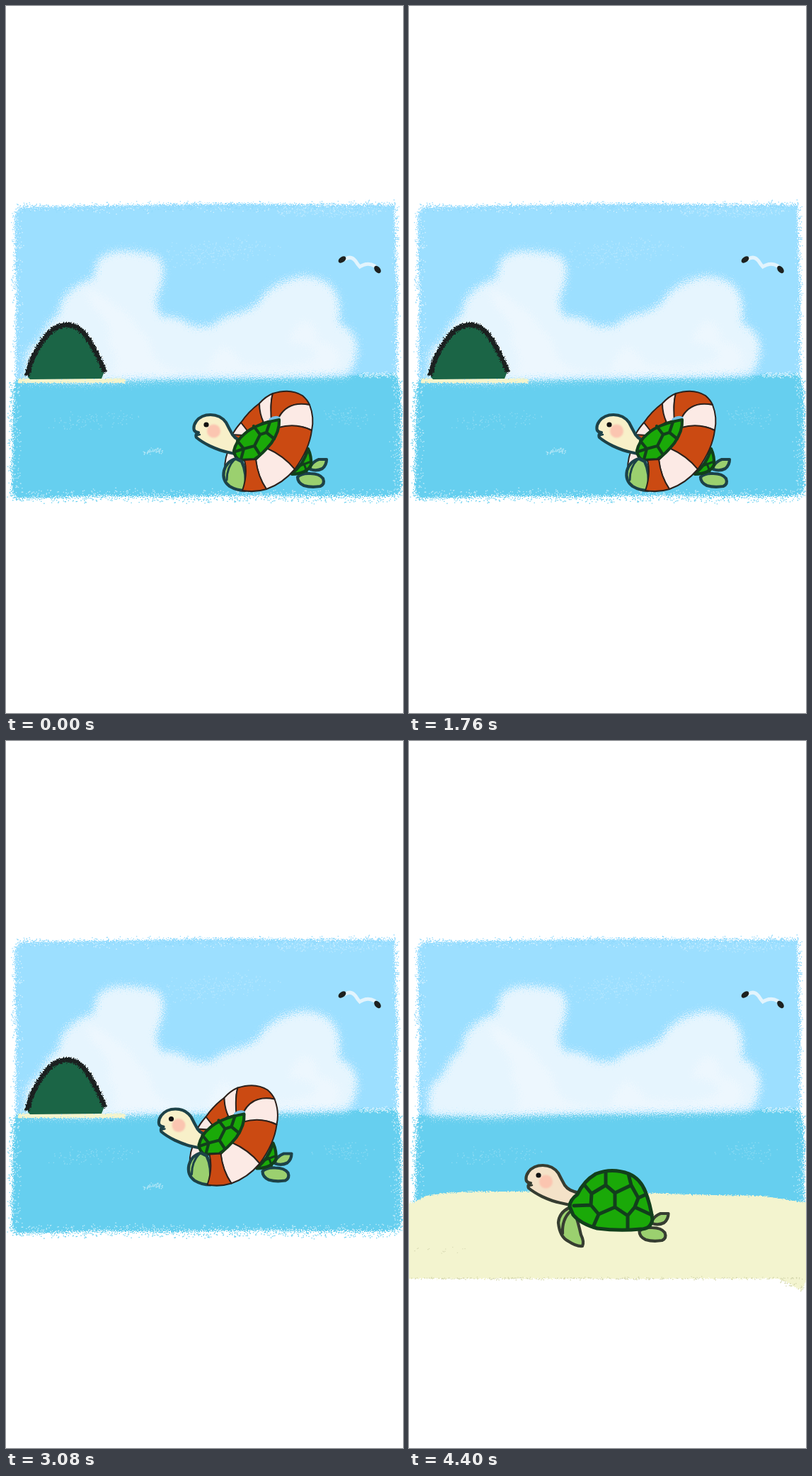
Write an HTML page that moves like this. It is 561 by 998 pixels and loops after 4.84 s.

```html
<!DOCTYPE html>
<html lang="en">
<head>
<meta charset="utf-8">
<title>Turtle at sea</title>
<style>
  html, body { margin: 0; width: 100%; height: 100%; overflow: hidden; background: #fff; }
  svg { display: block; width: 100vw; height: 100vh; }
  .ink { stroke-width: 4.2; stroke-linejoin: round; stroke-linecap: round; }
  .line { fill: none; }
  .leaf { fill: #9bd06f; }
  .shell { fill: #1aa908; stroke: #123f1c; }
  .ring path { stroke: #2b211c; stroke-width: 2; }
  .red { fill: #cb4a12; }
  .pale { fill: #fceae5; }
</style>
</head>
<body>
<svg viewBox="0 0 561 998">
  <defs>
    <filter id="chalk" filterUnits="userSpaceOnUse" x="0" y="240" width="561" height="560" color-interpolation-filters="sRGB">
      <feTurbulence type="fractalNoise" baseFrequency=".75" seed="4" result="n"/>
      <feDisplacementMap in="SourceGraphic" in2="n" scale="14" xChannelSelector="R" yChannelSelector="G"/>
    </filter>
    <filter id="crayon" filterUnits="userSpaceOnUse" x="0" y="240" width="561" height="560" color-interpolation-filters="sRGB">
      <feTurbulence type="fractalNoise" baseFrequency=".6" seed="3" result="n"/>
      <feDisplacementMap in="SourceGraphic" in2="n" scale="7" xChannelSelector="R" yChannelSelector="G"/>
    </filter>
    <filter id="fluff" filterUnits="userSpaceOnUse" x="0" y="240" width="561" height="560" color-interpolation-filters="sRGB">
      <feGaussianBlur in="SourceGraphic" stdDeviation="4.500" result="b"/>
      <feTurbulence type="fractalNoise" baseFrequency=".7" seed="9" result="n"/>
      <feDisplacementMap in="b" in2="n" scale="32" xChannelSelector="R" yChannelSelector="G"/>
    </filter>
    <filter id="pencil" filterUnits="userSpaceOnUse" x="0" y="240" width="561" height="560" color-interpolation-filters="sRGB">
      <feTurbulence type="fractalNoise" baseFrequency=".6" seed="2" result="n"/>
      <feDisplacementMap in="SourceGraphic" in2="n" scale="1.500" xChannelSelector="R" yChannelSelector="G"/>
    </filter>
    <filter id="soft"><feGaussianBlur stdDeviation="1.2"/></filter>

    <g id="head">
      <path fill="currentColor" d="M342 616Q326 614 320 605Q315 596 311 588Q303 577 289 577Q276 577 269 586Q264 593 266 599Q268 602 272 602Q267 604 269 609Q276 615 288 621Q303 628 314 630L332 634Z"/>
      <path class="line" d="M270 606l4-1" stroke-width="2.5"/>
      <circle cx="293.500" cy="600" r="9.500" fill="#fbc5b0" stroke="none" filter="url(#soft)"/>
      <circle cx="283" cy="591" r="3.600" fill="#111" stroke="none"/>
    </g>
    <g id="feet">
      <path class="leaf" d="M430 650Q434 643 442 640L453 640Q453 648 447 653Q439 657 430 654Z"/>
      <path class="leaf" d="M412 665Q418 659 430 660Q443 660 448 667Q451 675 444 678Q431 680 421 677Q412 673 412 665Z"/>
    </g>
  </defs>

  <path filter="url(#chalk)" fill="#9cdfff" d="M24 284L150 282L240 280L340 279L450 281L549 281L552 400L552 530L14 530L15 410L12 298Q13 287 24 284Z"/>
  <g id="skyDust"></g>
  <path filter="url(#chalk)" fill="#66cfef" d="M12 528L180 527L320 526L480 523L500 520L553 520L557 545L558 680Q556 692 540 692L450 692L350 691L240 693L130 692L14 695L9 685L10 600Z"/>
  <g id="seaDust"></g>
  <g filter="url(#fluff)">
    <path fill="#e6f5fe" d="M28 528Q25 500 32 484Q46 476 54 458Q62 442 74 436Q76 414 90 403Q104 389 122 385Q126 376 128 362Q138 347 160 346Q190 345 214 353Q224 362 222 382Q218 402 213 412Q212 430 220 438Q246 437 260 450Q276 454 292 451Q304 438 330 433Q356 425 363 409Q384 386 422 381Q460 384 469 411Q474 433 470 448Q491 455 496 478Q496 508 482 521Q400 525 300 525Q200 526 120 531Z"/>
    <path fill="#f1f8ff" d="M112 398Q142 410 152 422Q181 438 184 454Q204 466 207 490Q217 513 250 516L285 518Q288 494 308 480Q326 490 335 506L390 510Q430 505 440 492Q427 474 400 476Q406 448 425 445Q443 454 439 474Q475 475 470 505L460 522L150 526Q163 497 144 476Q153 449 122 425Z" opacity=".7"/>
  </g>

  <g id="bird" filter="url(#pencil)" stroke-linecap="round">
    <path fill="none" stroke="#e2f4fd" stroke-width="5" d="M480 357Q488 352 494 360Q497 365 500 368Q511 361 521 367"/>
    <ellipse cx="475" cy="358" rx="6" ry="3.800" transform="rotate(-35 475 358)" fill="#1d211f"/>
    <ellipse cx="525" cy="372" rx="6" ry="3.800" transform="rotate(50 525 372)" fill="#1d211f"/>
  </g>

  <g id="ocean">
    <path filter="url(#crayon)" stroke="#f4f4cd" stroke-width="6" d="M17 529H168"/>
    <path filter="url(#pencil)" fill="#1b6546" d="M31 524Q36 499 48 479Q64 454 84 450Q102 451 113 466Q128 488 139 516L135 526L34 527Z"/>
    <path filter="url(#crayon)" fill="none" stroke="#1b2020" stroke-width="7" d="M30 522Q34 500 48 478Q64 452 84 450Q103 450 115 468Q129 490 140 517"/>
    <g id="swimmer">
      <g class="ink" filter="url(#pencil)" stroke="#1d4248" color="#f8f0c9">
        <use href="#feet"/>
        <path class="shell" d="M404 660Q420 648 427 625Q432 636 431 648Q425 660 404 661Z"/>
        <path class="line" stroke="#123f1c" stroke-width="3" d="M413 650L431 643M421 646L425 657"/>
        <g class="ring">
          <path class="pale" d="M309 655Q309 636 316 624L330 628L325 642Z"/>
          <path class="red" d="M314 616Q316 608 321 603L345 601L330 622Z"/>
          <path class="pale" d="M320 605Q324 597 332 588L346 597L335 606Z"/>
          <path class="red" d="M332 588Q343 572 358 561Q359 575 365 586L343 602Z"/>
          <path class="pale" d="M358 561Q367 551 377 547Q372 566 377 584L364 588Q358 575 358 561Z"/>
          <path class="red" d="M377 547Q402 539 419 550Q426 556 429 563Q400 558 387 578L386 586L375 586Q373 560 377 547Z"/>
          <path class="pale" d="M429 563Q436 581 432 599Q411 588 383 597L386 580Q399 557 429 563Z"/>
          <path class="red" d="M432 599Q429 625 408 654Q392 636 367 625Q379 614 385 595Q410 588 432 599Z"/>
          <path class="pale" d="M408 654Q391 674 368 682Q355 662 353 641Q361 634 368 624Q393 635 408 654Z"/>
        </g>
        <path class="line" stroke="#73bee3" stroke-width="5" d="M374 584Q380 580 385 582"/>
        <use href="#head"/>
        <path class="shell" d="M322 628Q325 614 337 604Q352 590 386 584Q387 600 375 617Q362 633 351 640L330 641Q323 637 322 628Z"/>
        <path class="line" stroke="#123f1c" d="M327 614L336 625L351 621L359 605L350 593M359 605L368 602L373 587M368 602L379 611M351 621L358 632M336 625L332 640M336 625L324 629"/>
        <path class="leaf" d="M325 639Q312 642 308 656Q305 670 316 678Q326 684 338 684Q341 659 333 643Z"/>
        <path class="line" stroke-width="3" d="M323 640Q312 651 312 669"/>
        <g class="ring"><path class="red" d="M337 641L353 640Q356 665 368 682Q352 687 334 684Q342 661 337 641Z"/></g>
      </g>
    </g>
  </g>

  <g id="beach">
    <path filter="url(#crayon)" fill="#f3f4cf" d="M-12 653L8 651L24 642Q62 635 110 636L205 636L330 638L430 641L500 642L530 647L573 653V759H562L555 776L523 759H-12Z"/>
    <g id="sandDust"></g>
    <g class="ink" filter="url(#pencil)" stroke="#363d31" color="#f4e2c8">
      <use href="#feet" x="-86.500" y="27"/>
      <use href="#head" x="-100" y="22"/>
      <path class="leaf" d="M226 659Q212 666 211 680Q213 700 225 706Q237 714 245 713Q248 707 243 697Q239 679 234 665Z"/>
      <path class="line" d="M228 664Q216 675 217 695"/>
      <g stroke-width="5">
        <path class="shell" d="M227 657Q227 648 238 640Q247 621 264 611Q287 602 311 611Q327 618 334 636Q341 654 344 675Q342 689 327 689Q297 692 266 688Q243 682 232 669Z"/>
        <path class="line" stroke="#123f1c" d="M278 608V627L258 639L249 628M278 627L291 638L314 627L310 611M314 627L324 645L335 640M324 645L319 658L309 670L291 658L268 668L257 655L258 639M291 638V658M309 670V689M319 658L343 669M268 668L261 684M257 655L233 656"/>
      </g>
    </g>
  </g>
</svg>
<script>
  const $ = id => document.getElementById(id);
  let seed = 7;
  const rand = () => (seed = seed * 16807 % 2147483647) / 2147483647;
  const spread = r => (rand() + rand() + rand() - 1.5) * r;

  // Scatters chalk grains around a straight line.
  function dust(id, fill, count, x0, y0, x1, y1, rx, ry = rx, opacity = 1) {
    let d = '';
    for (let i = 0; i < count; i++) {
      const t = rand();
      const x = x0 + (x1 - x0) * t + spread(rx), y = y0 + (y1 - y0) * t + spread(ry);
      d += `M${x.toFixed(1)} ${y.toFixed(1)}h1.3v1.3h-1.3z`;
    }
    const path = document.createElementNS('http://www.w3.org/2000/svg', 'path');
    path.setAttribute('d', d);
    path.setAttribute('fill', fill);
    path.setAttribute('opacity', opacity);
    $(id).append(path);
  }

  const sky = '#8ed8fb', sea = '#66cfef', white = '#fff';
  dust('skyDust', sky, 700, 16, 284, 550, 281, 6);
  dust('skyDust', sky, 220, 13, 290, 14, 525, 6);
  dust('skyDust', sky, 200, 551, 282, 552, 520, 4);
  dust('skyDust', white, 120, 16, 287, 548, 286, 6, 6, .6);
  dust('skyDust', white, 100, 18, 290, 18, 525, 6, 6, .6);
  dust('skyDust', white, 70, 549, 284, 550, 520, 5, 5, .6);
  dust('skyDust', white, 200, 390, 290, 535, 291, 8, 8, .3);
  dust('skyDust', white, 250, 240, 355, 350, 340, 40, 18, .25);
  dust('seaDust', sea, 250, 9, 530, 9, 694, 6);
  dust('seaDust', sea, 250, 556, 530, 556, 694, 5);
  dust('seaDust', sea, 450, 10, 695, 552, 695, 6);
  dust('seaDust', white, 350, 18, 688, 545, 687, 8, 6, .6);
  dust('seaDust', white, 110, 14, 530, 14, 690, 8, 8, .6);
  dust('seaDust', white, 130, 552, 525, 552, 690, 8, 8, .6);
  dust('seaDust', white, 110, 500, 521, 555, 520, 5, 4, .7);
  dust('seaDust', white, 60, 195, 629, 220, 627, 6, 4, .5);
  dust('seaDust', white, 100, 75, 589, 170, 582, 20, 12, .25);
  dust('seaDust', white, 80, 450, 580, 505, 580, 20, 14, .25);
  dust('sandDust', '#d3d6ac', 240, 0, 758, 561, 758, 3, 2);
  dust('sandDust', '#d3d6ac', 25, 525, 760, 555, 775, 5);
  dust('sandDust', '#d9dbb5', 14, 5, 718, 90, 717, 15, 4);

  const STEP = 440, FRAMES = 11;
  const bob = [[0, 0], [15, -29], [-2.5, -59.5], [15, -29], [0, 0]];
  let shown = -1;

  function draw(now) {
    const i = Math.floor(now / STEP) % FRAMES;
    if (i !== shown) {
      shown = i;
      const ashore = i === FRAMES - 1;
      $('ocean').style.display = ashore ? 'none' : '';
      $('beach').style.display = ashore ? '' : 'none';
      const [x, y] = bob[i % 5];
      const [dx, dy] = i < 5 ? [0, 0] : [-47, 2];
      $('swimmer').setAttribute('transform', `translate(${x + dx} ${y + dy})`);
    }
    requestAnimationFrame(draw);
  }
  draw(performance.now());
</script>
</body>
</html>
```
